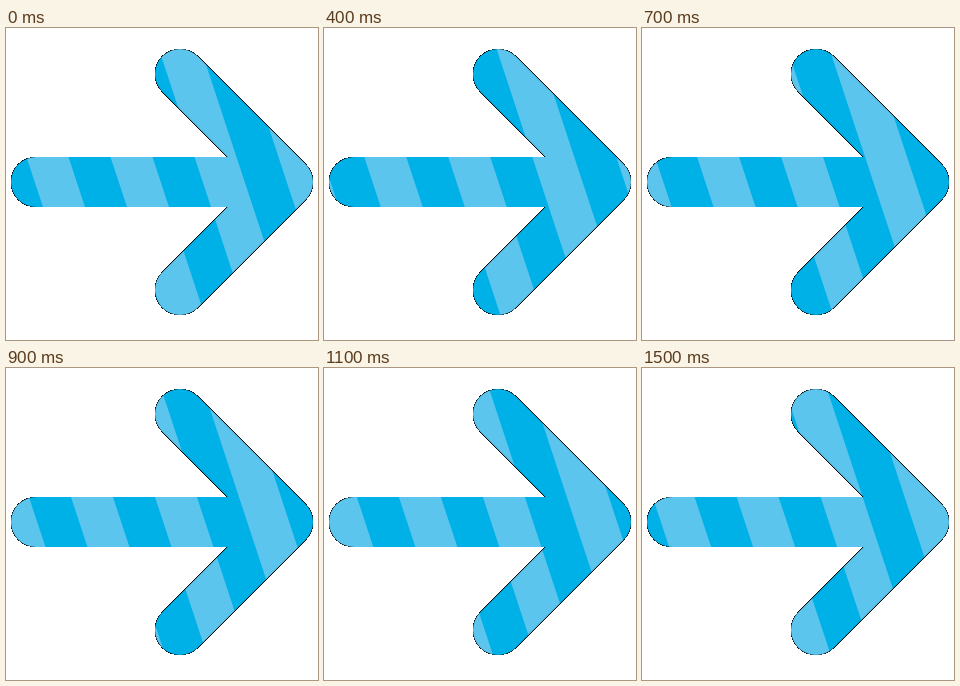
Animation, 312 px wide and 312 px high, one loop 1600 ms. Source, as an HTML page with a canvas:

```html
<!DOCTYPE html>
<html lang="en">
<head>
<meta charset="utf-8">
<title>Striped arrow</title>
<style>
  html, body { margin: 0; width: 100%; height: 100%; overflow: hidden; background: #fff; }
  canvas { display: block; width: 312px; height: 312px; }
</style>
</head>
<body>
<canvas id="stage" width="312" height="312"></canvas>
<script>
const SIZE = 312;
const LIGHT = '#5bc5ee', DARK = '#00b1e7';
const LOOP = 1600, STEP = 100;
const PERIOD = 84, SHIFT = PERIOD / 17;
const START = 20.5, BASE_Y = 129, SLANT = 0.33;

const ctx = document.getElementById('stage').getContext('2d');

// White outside the arrow; partly covered rim pixels darken towards black.
function makeCover() {
  const cover = document.createElement('canvas');
  cover.width = cover.height = SIZE;
  const c = cover.getContext('2d');
  c.lineWidth = 50;
  c.lineCap = c.lineJoin = 'round';
  c.beginPath();
  c.moveTo(174, 46);
  c.lineTo(282, 154);
  c.lineTo(174, 262);
  c.moveTo(30, 154);
  c.lineTo(282, 154);
  c.stroke();

  const image = c.getImageData(0, 0, SIZE, SIZE);
  const px = image.data;
  for (let i = 0; i < px.length; i += 4) {
    const alpha = px[i + 3];
    const outside = alpha < 6;
    px[i] = px[i + 1] = px[i + 2] = outside ? 255 : 0;
    px[i + 3] = outside ? 255 : 255 - alpha;
  }
  c.putImageData(image, 0, 0);
  return cover;
}

const cover = makeCover();

function drawStripe(left) {
  const top = left - SLANT * BASE_Y;
  const bottom = top + SLANT * SIZE;
  ctx.beginPath();
  ctx.moveTo(top, 0);
  ctx.lineTo(top + PERIOD / 2, 0);
  ctx.lineTo(bottom + PERIOD / 2, SIZE);
  ctx.lineTo(bottom, SIZE);
  ctx.fill();
}

function draw(now) {
  const step = Math.floor((now % LOOP) / STEP);
  const offset = START + step * SHIFT;
  ctx.fillStyle = DARK;
  ctx.fillRect(0, 0, SIZE, SIZE);
  ctx.fillStyle = LIGHT;
  for (let i = -3; i < 5; i++) drawStripe(offset + i * PERIOD);
  ctx.drawImage(cover, 0, 0);
}

const begin = performance.now();
function tick() {
  draw(performance.now() - begin);
  requestAnimationFrame(tick);
}
tick();
</script>
</body>
</html>
```
